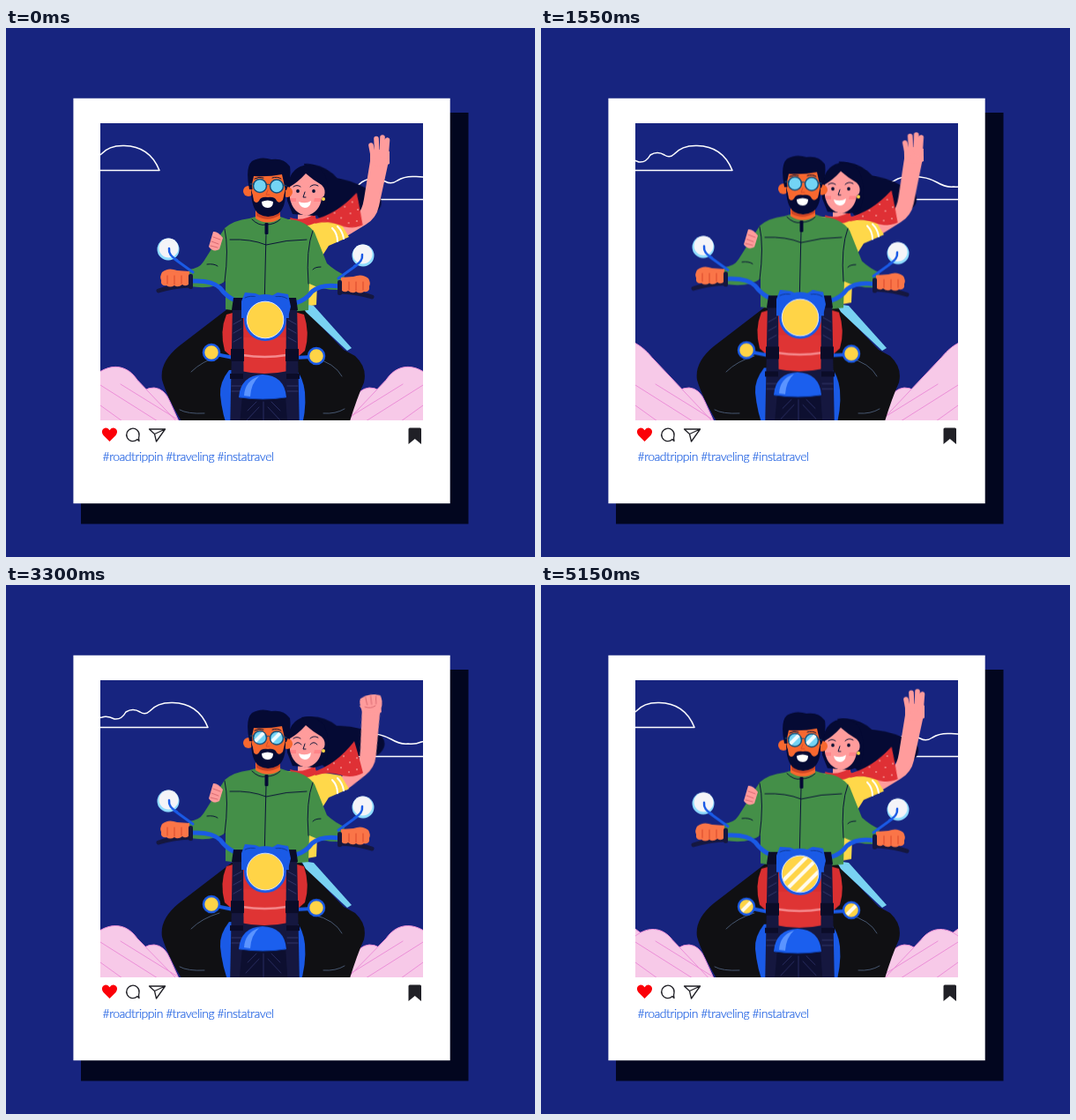
An HTML page without scripts that plays this animation: 600x600 px, repeating every 5200 ms.

```html
<!DOCTYPE html>
<html lang="en">
<head>
<meta charset="utf-8">
<title>Road trip</title>
<style>
html, body { margin: 0; width: 100%; height: 100%; overflow: hidden; background: #17247f; }
svg { display: block; width: 100vw; height: 100vh; }
.tag { font: 300 14px Lato, "Open Sans", sans-serif; letter-spacing: -.475px; fill: #1257e0; stroke: #1257e0; stroke-width: .15; }
.line { fill: none; stroke-linecap: round; stroke-linejoin: round; }
.cloud { stroke: #fff; stroke-width: 1.5; }
.ink { stroke: #0b1438; stroke-width: 1; }
.blue { stroke: #1a5ae6; }
.hair { fill: #050a34; }
.skin { fill: #ff9c9c; }
.tan { fill: #f8682f; }
.hand { fill: #fa7548; }
.navy { fill: #15173f; }
.leaf { fill: #f7c9e8; stroke: #ec8fd8; stroke-width: 1; }

.drift-r { animation: drift-r 2.6s cubic-bezier(.37,0,.63,1) infinite alternate; }
.drift-l { animation: drift-l 2.6s cubic-bezier(.37,0,.63,1) infinite alternate; }
@keyframes drift-r { to { transform: translateX(66px); } }
@keyframes drift-l { to { transform: translateX(-66px); } }

.bounce { animation: bounce .74286s linear infinite; }
@keyframes bounce {
  0% { transform: translateY(6px); }
  12% { transform: translateY(2.5px); }
  30% { transform: translateY(.6px); }
  48% { transform: translateY(0); }
  70% { transform: translateY(1px); }
  93% { transform: translateY(2.5px); }
  100% { transform: translateY(6px); }
}
.blow { transform-origin: 348px 165px; animation: blow .74286s ease-in-out infinite; }
@keyframes blow {
  0%, 100% { transform: rotate(11deg); }
  45% { transform: rotate(1deg); }
  70% { transform: rotate(-1deg); }
  93% { transform: rotate(5deg); }
}
.flap { transform-origin: 352px 210px; animation: flap .74286s ease-in-out infinite; }
@keyframes flap {
  0%, 100% { transform: rotate(5deg); }
  50% { transform: rotate(0deg); }
}
.wave { transform-origin: 398px 222px; animation: wave 5.2s ease-in-out infinite; }
@keyframes wave {
  0%, 21%, 100% { transform: none; }
  60% { transform: rotate(-7deg); }
  78% { transform: rotate(-5.5deg); }
}
.fingers { transform-origin: 424px 143px; animation: fold .74286s linear infinite; }
@keyframes fold {
  0%, 18%, 88%, 100% { transform: none; }
  30%, 78% { transform: scaleY(.3); }
}
.fist { animation: fist .74286s step-end infinite; }
@keyframes fist { 0% { opacity: 0; } 27% { opacity: 1; } 81% { opacity: 0; } }

.open { animation: open 5.2s step-end infinite; }
.shut { animation: shut 5.2s step-end infinite; }
@keyframes open { 50% { opacity: 0; } 67% { opacity: 1; } }
@keyframes shut { 0% { opacity: 0; } 50% { opacity: 1; } 67% { opacity: 0; } }

.glare { stroke: #fff; stroke-width: 4; opacity: .9; }
.lamp { animation: lamp 5.2s linear infinite; }
@keyframes lamp {
  0%, 34% { transform: translate(-70px,-70px); }
  38.5% { transform: translate(16px,16px); }
  41%, 96% { transform: translate(70px,70px); }
  96.1% { transform: translate(-70px,-70px); }
  99%, 100% { transform: none; }
}
.lens { animation: lens 5.2s linear infinite; }
@keyframes lens {
  0%, 61% { transform: translate(-22px,-22px); }
  63.5% { transform: none; }
  66%, 97% { transform: translate(22px,22px); }
  97.1% { transform: translate(-22px,-22px); }
  99%, 100% { transform: none; }
}

.grow { animation: grow .94546s linear infinite; animation-delay: -.791s; }
.grow.late { animation-delay: -.318s; }
@keyframes grow {
  0% { d: path("M130 455L146 430C150 404 174 402 183 416L200 455Z"); }
  12% { d: path("M126 455L142 428C148 404 172 402 181 414L199 455Z"); }
  24% { d: path("M80 455L95 425C108 393 134 386 149 404L196 455Z"); }
  33% { d: path("M70 455L85 412C108 381 134 379 149 401L197 450Z"); }
  45% { d: path("M60 455L85 395C108 347 134 345 148 372L198 450Z"); }
  50% { d: path("M50 455L50 380C60 335 85 357 107 375L198 450Z"); }
  62% { d: path("M50 455L50 380C60 335 85 357 107 375L196 450Z"); }
  78% { d: path("M50 455L50 385C60 345 85 365 107 382L190 450Z"); }
  83%, 100% { d: path("M50 470L50 460C55 455 80 455 90 460L190 470Z"); }
}
</style>
</head>
<body>
<svg viewBox="0 0 600 600">
  <defs>
    <clipPath id="photo"><path d="M107 108h366v337H107z"/></clipPath>
    <clipPath id="lampClip"><circle cx="294" cy="325" r="20"/><circle cx="233" cy="362" r="7.5"/><circle cx="352" cy="366" r="7.5"/></clipPath>
    <clipPath id="lensClip"><circle cx="288" cy="173" r="7"/><circle cx="307" cy="173.500" r="7"/></clipPath>
    <clipPath id="scarfClip"><path id="scarf" d="M348 212Q374 204 395 177Q399 190 405 213Q392 220 378 215Q364 211 351 216Z"/></clipPath>
    <path id="hump" class="leaf" d="M138 455L150 420Q155 408 168 408Q180 409 186 424L200 455Z"/>
    <path id="veins" class="line" stroke="#ec8fd8" d="M107 405L172 446M107 428L132 446M130 404L193 443"/>
    <g id="fork">
      <path class="navy" d="M257 306h12l1 150h-16z"/>
      <path fill="#0b0c28" d="M258 300h11v14h-13zM255 358h15v14h-15zM254 386h15v6h-15z"/>
      <path class="line" stroke="#33376b" d="M258 330l9 -5M258 340l9 -5M258 350l9 -5M256 400h12M256 406h12"/>
    </g>
    <g id="mirror">
      <path class="line blue" stroke-width="3" d="M185 244Q184 252 194 258L212 271"/>
      <circle cx="184" cy="245" r="12.500" fill="#8fdcff"/>
      <circle cx="184.500" cy="243.500" r="11" fill="#f4f4f8"/>
      <path class="line blue" stroke-width="2.500" d="M185 244Q184 252 194 257"/>
    </g>
    <g id="grip">
      <path class="line" stroke="#15173f" stroke-width="5" d="M173 292Q188 287 208 286"/>
      <path class="hand" d="M177 271Q184 265 194 269L208 270L208 284Q204 288 200 285Q195 289 191 286Q186 289 182 286Q175 287 176 280Q174 276 177 271Z"/>
      <path class="line" stroke="#d9482a" d="M183 275v9M191 275v10M199 275v9"/>
      <rect class="navy" x="207" y="273" width="5" height="17" rx="2"/>
    </g>
  </defs>

  <path fill="#17247f" d="M0 0h600v600H0z"/>
  <path fill="#02061f" d="M85 96h439.500v466.500H85z"/>
  <path fill="#fff" d="M76.400 79.700h427.300v459.600H76.400z"/>
  <path fill="#17247f" d="M107 108h366v337H107z"/>

  <g clip-path="url(#photo)">
    <path class="line cloud drift-r" d="M38 161.500H174Q163 134 134 133.500Q117 133 108 143Q103 148 97 144Q89 139 81 144Q76 153 68 152Q60 148 54 150Q44 151 38 161"/>
    <path class="line cloud drift-l" d="M560 194.500H391Q398 172 415 171Q424 171 430 174Q437 178 444 173Q452 168 463 168.500Q480 168 492 175Q502 181 511 180Q519 181 526 178Q536 175 550 184"/>
    <g>
      <use href="#hump"/>
      <path class="leaf grow late"/>
      <path class="leaf grow"/>
      <use href="#veins"/>
    </g>
    <g transform="matrix(-1 0 0 1 580 0)">
      <use href="#hump"/>
      <path class="leaf grow late"/>
      <path class="leaf grow"/>
      <use href="#veins"/>
    </g>

    <!-- passenger -->
    <g class="bounce">
      <path class="hair blow" d="M335 150Q358 146 375 159Q400 158 427 171Q434 181 423 191Q404 197 393 190Q383 207 364 208L345 190Z"/>
      <g class="wave">
        <path class="skin" d="M413 145L434 145L423 196Q420 210 408 217L385 231L376 218L398 206Q404 201 406 188Z"/>
        <path class="skin" d="M413 134Q424 130 435 134L435 148Q424 154 413 148Z"/>
        <g class="line fingers" stroke="#ff9c9c" stroke-width="5.600">
          <path d="M417 143L414 127M421 139L420 119.500M426.500 138L427 118M431 140L432.500 121"/>
        </g>
        <g class="fist">
          <path class="skin" d="M413 130Q424 124 436 129Q439 138 434 146Q424 150 415 146Q410 137 413 130Z"/>
          <path class="line" stroke="#d96a72" d="M419 129l1 9M425 128v10M431 129l-1 9M417 140q7 3 12 0"/>
        </g>
      </g>
      <path fill="#ffd84a" d="M316 211L350 211L380 216L389 231L366 241L354 260L352 308L330 312Z"/>
      <path class="line" stroke="#fff" stroke-width="2" d="M370 221Q376 227 376 236M376 219Q382 225 383 233"/>
      <path class="skin" d="M331 195h20v15q-10 7 -20 2z"/>
      <g class="flap">
        <use href="#scarf" fill="#df3035"/>
        <g clip-path="url(#scarfClip)">
          <path class="line" stroke="#ffd9d2" stroke-width="1.600" d="M372 202h0M383 194h0M391 188h0M380 207h0M390 201h0M398 196h0M398 209h0M389 212h0M365 209h0"/>
        </g>
      </g>
      <path fill="#df3035" d="M322 209Q336 214 350 205L353 214Q338 222 324 216Z"/>
      <path class="hair" d="M319 190Q317 158 334 151Q350 145 361 159Q370 180 362 203L350 207L325 205Z"/>
      <path class="skin" d="M322 174Q331 169 340 159Q349 167 358 172Q363 177 361 184L358 187Q356 203 341 207Q325 204 322 187Z"/>
      <circle cx="360" cy="188" r="2" fill="#ffd84a"/>
      <path class="line ink" stroke-width="1.300" d="M326 174q4 -3 8 0M345 174q4 -4 9 -1M339 180l-2 6h3"/>
      <path fill="#ff6f76" opacity=".5" d="M322 187h7v4h-6zM350 187h7v4h-8z"/>
      <g class="open" fill="#081033"><circle cx="331" cy="179" r="1.900"/><circle cx="349" cy="179" r="1.900"/></g>
      <path class="line ink shut" d="M327 181q4 -5 8 0M345 181q4 -5 8 0"/>
      <path fill="#fff" d="M332 191Q340 194 346 190Q345 198 339 198Q333 197 332 191Z"/>
    </g>

    <!-- legs -->
    <path fill="#101013" d="M256 315L196 361Q174 379 177 399Q182 417 199 446H390Q398 420 406 402Q410 385 396 372L383 365L333 313Z"/>
    <path fill="#79d2f2" d="M335 313L349 315L392 363L387 366L340 322Z"/>
    <path class="line" stroke="#46566f" d="M242 372Q222 378 210 390M349 374Q373 380 381 395M197 433q9 5 28 4M360 437q14 1 24 -5"/>

    <!-- rider -->
    <g class="bounce">
      <path fill="#448f48" d="M248 221Q258 212 276 210L283 208H311L320 211Q340 212 350 226L364 261Q374 270 384 274L381 291Q360 292 344 284L343 314Q296 320 249 313L249 281Q236 291 208 287L207 268Q219 267 224 259Z"/>
      <path class="line ink" d="M254 234Q278 233 295 240Q318 234 341 234M295 228L293 312M248 222Q253 244 248 282M348 224Q340 245 343 284M228 262q8 -1 12 2M357 265q-7 0 -9 3M279 211q8 8 16 6q10 0 16 -6"/>
      <rect class="hair" x="293.500" y="215" width="4" height="13" rx="1"/>
      <path class="tan" d="M283 196H311V210Q297 219 283 210Z"/>
      <path fill="#cf4525" d="M284 202Q298 213 311 202V206Q297 215 284 207Z"/>
      <circle class="tan" cx="275" cy="179" r="6"/>
      <circle class="tan" cx="319" cy="180" r="6"/>
      <path class="hair" d="M276 177Q271 152 279 145Q289 139 301 143Q315 141 322 151Q324 164 318 178Z"/>
      <path class="tan" d="M279 171L281 162Q298 163 313 160L317 178L314 195Q297 204 281 195Z"/>
      <path class="hair" d="M278 176L281 190Q284 194 287 190Q289 185 297 186Q305 185 307 190Q310 194 314 189L317 176Q318 199 308 205Q297 211 287 205Q278 199 278 176Z"/>
      <path fill="#fff" d="M290 191Q297 188 303 191Q303 198 297 198Q290 198 290 191Z"/>
      <path class="line" stroke="#d94d2b" d="M297 178l-2 5h4"/>
      <g fill="#73d4f5" stroke="#164d76" stroke-width="1.500">
        <circle cx="288" cy="173" r="7.500"/><circle cx="307" cy="173.500" r="7.500"/>
      </g>
      <path class="line" stroke="#164d76" d="M295 172q2 -2 4.500 0M281 171l-4 0M314 172l4 1"/>
      <path class="line ink" stroke-width="1.800" d="M282 165q5 -3 10 -1M302 164q6 -2 10 1"/>
      <g clip-path="url(#lensClip)"><path class="glare lens" stroke-width="2" d="M282 178l11 -11M301 178l11 -11"/></g>
      <path class="skin" d="M235 225Q240 224 246 232L242 245Q235 249 230 242Z"/>
      <path class="line" stroke="#d96a72" d="M235 231l8 3M233 236l8 3M232 241l8 2"/>

      <!-- motorcycle -->
      <use href="#mirror"/>
      <use href="#mirror" transform="matrix(-1 0 0 1 589 7)"/>
      <path class="line blue" stroke-width="5" d="M212 281Q234 280 243 289Q250 299 262 304M378 287Q358 284 347 293Q340 303 328 306"/>
      <use href="#grip"/>
      <use href="#grip" transform="matrix(-1 0 0 1 588 7)"/>
      <path fill="#1a5ae6" d="M253 382Q242 396 243 410Q245 433 254 455H333Q341 430 339 407Q337 390 329 382Z"/>
      <path class="navy" d="M259 372h68v83h-68z"/>
      <path fill="#d92f31" d="M250 319Q294 305 338 319Q345 340 339 360L330 368H257L248 360Q242 338 250 319Z"/>
      <path fill="#df3434" d="M266 345h54v38q-27 6 -54 0z"/>
      <path class="line" stroke="#f58a8d" stroke-width="2.500" d="M268 365q26 4 50 0"/>
      <path class="line blue" stroke-width="4" d="M238 364L258 368M347 367L328 368"/>
      <use href="#fork"/>
      <use href="#fork" transform="matrix(-1 0 0 1 587 0)"/>
      <path fill="#1a5ae6" d="M267 304L271 294L283 295L290 298H301L308 294L320 296L323 310L320 322H267Z"/>
      <path class="line" stroke="#103993" d="M271 300q6 -3 14 -1M305 299q8 -2 14 2"/>
      <path fill="#1a5ae6" d="M267 323A27 27 0 0 1 321 323Z"/>
      <circle cx="294" cy="325" r="24" fill="#1a5ae6"/>
      <circle cx="294" cy="325" r="20.800" fill="#ffd447" stroke="#dfe9ff"/>
      <g fill="#ffd447" stroke="#1a5ae6" stroke-width="2.500"><circle cx="233" cy="362" r="9"/><circle cx="352" cy="366" r="9"/></g>
      <g clip-path="url(#lampClip)">
        <path class="glare lamp" d="M274 333l28 -28M279 342l32 -32M290 347l25 -25M228 367l10 -10M347 371l10 -10"/>
      </g>
      <path fill="#0d0f30" d="M268 411h49l3 45h-56z"/>
      <path class="line" stroke="#292d60" d="M292 418v32M287 424l-15 16M297 424l15 16M284 418l-10 10M301 418l10 10"/>
      <path fill="#1b5fee" d="M264 413Q266 388 291 387Q316 388 318 413Q291 417 264 413Z"/>
      <path fill="#5b94ff" d="M270 411Q271 394 287 389Q278 397 277 412Z"/>
      <path class="line" stroke="#0e3fb0" d="M265 413q27 4 52 0"/>
    </g>
  </g>

  <path fill="#fb0008" d="M117.500 469L110.500 462C107 457.500 110 453.500 113.500 453.500Q116 453.500 117.500 456.200Q119 453.500 121.500 453.500C125 453.500 128 457.500 124.500 462Z"/>
  <g class="line" stroke="#202026" stroke-width="1.300">
    <path d="M149 466.500A7.200 7.200 0 1 1 151 462.500Q150 465 151 468.500Z"/>
    <path d="M162.500 455H180.500L170.500 469L168.500 460.500ZM168.500 460.500L180.500 455"/>
  </g>
  <path fill="#202026" d="M456.500 455q0 -1.500 1.500 -1.500h11.500q1.500 0 1.500 1.500v17l-7.200 -6l-7.300 6z"/>
  <text class="tag" x="109.500" y="491">#roadtrippin #traveling #instatravel</text>
</svg>
</body>
</html>
```
